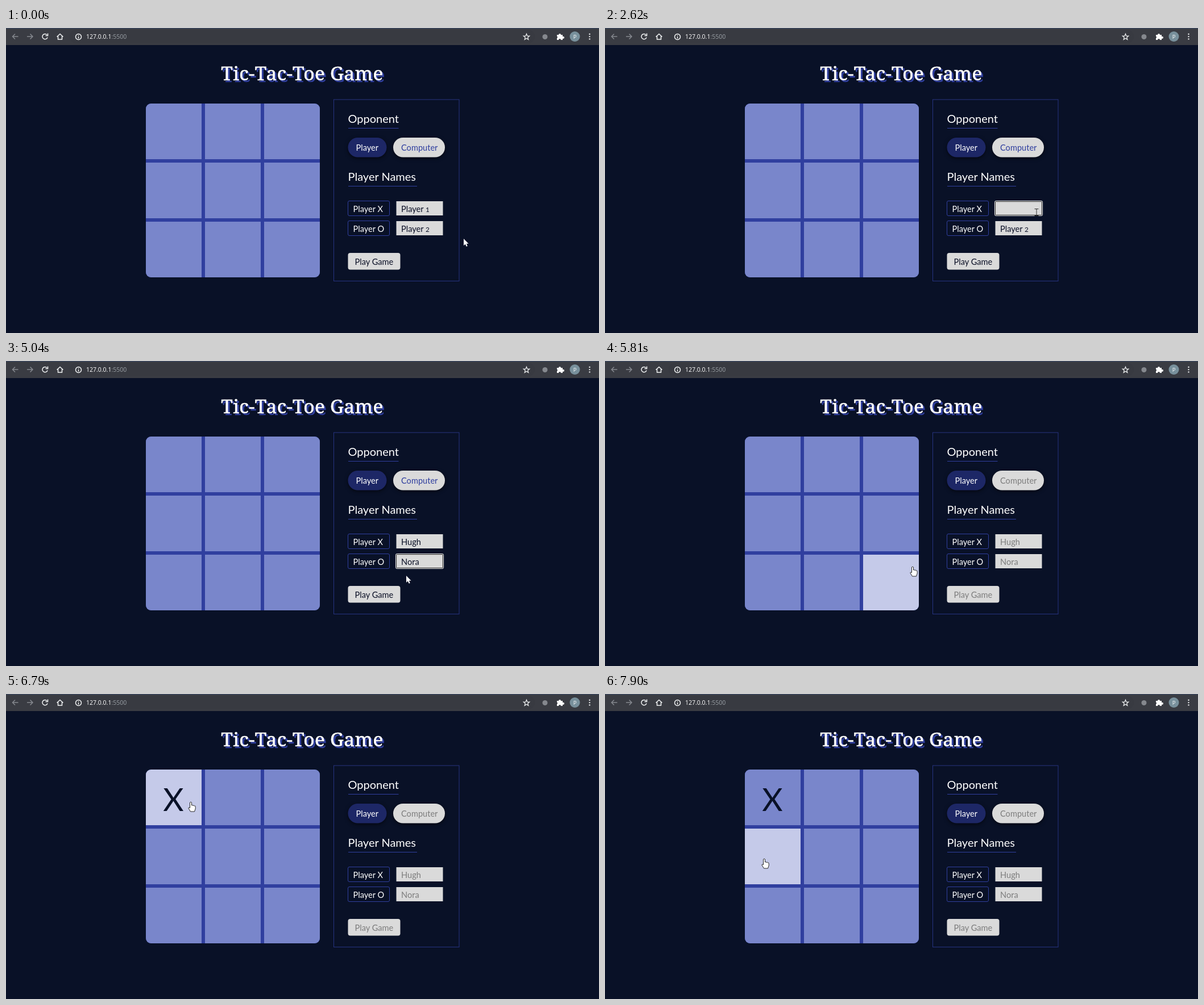
Write an HTML page that moves like this. It is 1043 px wide and 537 px high and loops after 8 s.

```html
<!DOCTYPE html>
<html lang="en">
<head>
<meta charset="utf-8">
<title>Tic-Tac-Toe Game</title>
<style>
  html, body { margin: 0; width: 100%; height: 100%; overflow: hidden; background: #091127; }
  svg { display: block; width: 100vw; height: 100vh; }
  text { font: 14.6px Lato, sans-serif; fill: #fff; white-space: pre; }
  .title { font: 33.5px "Noto Serif", serif; letter-spacing: .3px; text-anchor: middle;
    stroke: #fff; stroke-width: .6; filter: drop-shadow(3px 3px 0 #303f9f); }
  .heading { font-size: 20px; }
  .url, #popup text { font: 10.5px "Open Sans", sans-serif; }
  .dim { fill: #9aa0a6; }
  .digit { font-size: 11.8px; }
  .mark { font-size: 56px; fill: #091127; text-anchor: middle; }
  .pill { filter: drop-shadow(0 2px 3px #0009); }
  .light { fill: #dadada; }
  .dark { fill: #0b1026; }
  .outline { fill: none; stroke: #303f9f; }
  .icon { fill: none; stroke: #f1f3f4; stroke-width: 1.5; }
  .off { stroke: #85888e; }
  .playing .control { fill: #7d7d7d; }
</style>
</head>
<body>
<svg id="stage" viewBox="0 0 1043 537" preserveAspectRatio="none">
  <defs><clipPath id="round"><rect x="246" y="133" width="306" height="306" rx="9"/></clipPath></defs>

  <!-- browser bar -->
  <rect width="1043" height="30" fill="#3a3c43"/>
  <rect x="112" y="3" width="818" height="24" rx="12" fill="#383a41"/>
  <rect width="1043" height="1" fill="#34435f"/>
  <path class="icon off" d="M21.500 15H11.500M16 10.500L11.500 15L16 19.500"/>
  <path class="icon off" d="M37 15H47M42.500 10.500L47 15L42.500 19.500"/>
  <path class="icon" d="M72 12A4.600 4.600 0 1 0 73 16.500M73.500 9.500V13.500H69.500"/>
  <path class="icon" d="M89.500 15.500L95 10.500L100.500 15.500M91.500 14.500V20H98.500V14.500"/>
  <circle class="icon" cx="127.500" cy="15.500" r="5" stroke-width="1.200"/>
  <path class="icon" d="M127.500 12.500V13.800M127.500 15V18.500"/>
  <text class="url" x="141" y="19.300">127.0.0.1<tspan class="dim">:5500</tspan></text>
  <path id="star" class="icon" style="stroke-width:1.200"/>
  <circle cx="948" cy="15.500" r="4.500" fill="#85888e"/>
  <path fill="#fff" d="M969 12H972A2 2 0 1 1 976 12H979V15A2 2 0 1 1 979 18.500V21H976A2 2 0 0 0 972 21H969V18A2 2 0 0 0 969 14.500Z"/>
  <circle cx="1000.500" cy="15" r="9" fill="#78909c"/>
  <text class="url" x="1000.500" y="18.500" text-anchor="middle" style="font-size:9.500px">P</text>
  <path d="M1026.500 10.800V20" stroke="#f1f3f4" stroke-width="2.400" stroke-linecap="round" stroke-dasharray="0 4.300"/>

  <text class="title" x="521" y="91.500">Tic-Tac-Toe Game</text>

  <g clip-path="url(#round)">
    <rect x="246" y="133" width="306" height="306" fill="#303f9f"/>
    <g id="cells"></g>
  </g>
  <text id="mark" class="mark" x="294.500" y="206">X</text>

  <!-- settings panel -->
  <rect class="outline" x="576.500" y="126" width="220.500" height="319.500" stroke-opacity=".75"/>
  <text class="heading" x="601.500" y="166.500">Opponent</text>
  <text class="heading" x="601.500" y="269">Player Names</text>
  <path class="outline" d="M602 176.500H690.500M602 278.500H723" stroke-width="1.200"/>
  <rect class="pill" x="601.500" y="193" width="68" height="34.500" rx="17.200" fill="#1d2766"/>
  <rect class="pill light" x="681" y="193" width="91" height="34.500" rx="17.200"/>
  <text x="615.500" y="216">Player</text>
  <text class="control" x="695" y="216" fill="#303f9f" id="computer">Computer</text>
  <rect class="outline" x="601.500" y="304.500" width="73" height="26" rx="2.500"/>
  <rect class="outline" x="601.500" y="339.500" width="73" height="26" rx="2.500"/>
  <text x="610.500" y="323.500">Player X</text>
  <text x="610.500" y="358.500">Player O</text>
  <rect class="light" x="686.500" y="305" width="82" height="25"/>
  <rect class="light" x="686.500" y="340" width="82" height="25"/>
  <g id="ring" fill="none">
    <rect x="685.500" y="304.500" width="84" height="26" rx="2" stroke="#fff"/>
    <rect x="686.500" y="305.500" width="82" height="24" rx="1" stroke="#101010"/>
  </g>
  <rect id="selection" y="344" height="18" fill="#3390ff"/>
  <text id="nameX" class="control dark" x="695" y="323.500"></text>
  <text id="nameO" class="control dark" x="695" y="358.500"></text>
  <path id="caret" d="M743.500 310V326" stroke="#222"/>
  <rect class="light" x="601.500" y="396" width="92" height="29.500" rx="4"/>
  <text class="control dark" x="613.500" y="417">Play Game</text>

  <g id="popup">
    <rect x="687" width="156" rx="2" fill="#292a2d" style="filter:drop-shadow(0 1px 1px #0008)"/>
    <text x="695"></text><text x="695"></text>
  </g>

  <g id="pointer">
    <path id="arrow" fill="#fff" d="M0 0V12L2.800 9.500L4.700 13.800L6.700 12.900L4.900 8.700H8.600Z"/>
    <path id="beam" fill="none" stroke="#333" d="M-3.500 -5.500H3.500M0 -5.500V6.500M-3.500 6.500H3.500"/>
    <path id="hand" fill="#fff" stroke="#111" stroke-width=".9" stroke-linejoin="round"
      d="M-1.500 1Q0 -1 1.500 1V6Q3 5 4 6.500Q5.500 5.500 6.300 7Q8 6.300 8.200 8.500V12L6.500 17H-.5L-4.200 11Q-4 9 -1.500 10.500Z"/>
  </g>
</svg>

<script>
const LOOP = 8000, STEP = 110;
const GAME_START = 5590, MARK_TIME = 6790;
const $ = id => document.getElementById(id);
const show = (node, on) => node.style.display = on ? '' : 'none';

// [time, x, y]
const track = [
  [0, 805, 371], [100, 799, 362], [330, 799, 362], [860, 759, 324],
  [3940, 759, 324], [4160, 752, 352], [4500, 699, 354], [4930, 699, 354],
  [5040, 704, 378], [5480, 668, 408], [5590, 660, 402], [5810, 541, 362],
  [6360, 372, 216], [6690, 325, 190], [6910, 325, 190], [7240, 362, 222],
  [7780, 283, 293], [7900, 280, 290]
];
const typedX = [
  [0, 'Player 1'], [1530, 'Player '], [1670, 'Player'], [1850, 'Playe'], [1970, 'Play'],
  [2080, 'Pla'], [2200, 'Pl'], [2420, 'P'], [2520, ''],
  [2970, 'H'], [3070, 'Hu'], [3290, 'Hug'], [3500, 'Hugh']
];
const typedO = [[0, 'Player 2'], [4720, 'N'], [4800, 'No'], [4870, 'Nor'], [4940, 'Nora']];
const suggestions = [
  [0, []], [1530, ['Player 1']], [2420, ['Player 1', 'Player 2']], [2620, []],
  [2970, ['Hugh']], [3500, []], [4720, ['Nora']], [4940, []]
];
const latest = (list, t) => list.findLast(entry => entry[0] <= t);

function pointerAt(t) {
  const i = track.findLastIndex(p => p[0] <= t);
  const [t0, x0, y0] = track[i], [t1, x1, y1] = track[i + 1] || [LOOP, x0, y0];
  const k = Math.floor((t - t0) / STEP) * STEP / (t1 - t0);
  return [x0 + (x1 - x0) * k, y0 + (y1 - y0) * k];
}

const inside = (x, y, left, top, w, h) => x >= left && x < left + w && y >= top && y < top + h;

function pointerKind(x, y, playing) {
  if (inside(x, y, 686, 305, 83, 25) || inside(x, y, 686, 340, 83, 25)) return 'beam';
  if (inside(x, y, 246, 133, 306, 306)) return 'hand';
  return !playing && inside(x, y, 601, 396, 92, 30) ? 'hand' : 'arrow';
}

const cells = Array.from({ length: 9 }, (_, i) => {
  const node = document.createElementNS('http://www.w3.org/2000/svg', 'rect');
  const x = 246 + i % 3 * 104, y = 133 + Math.floor(i / 3) * 104;
  for (const [key, value] of Object.entries({ x, y, width: 98, height: 98 })) node.setAttribute(key, value);
  $('cells').append(node);
  return { node, x, y };
});

$('star').setAttribute('d', 'M' + Array.from({ length: 10 }, (_, i) => {
  const r = i % 2 ? 2.4 : 5.6, a = (i / 5 - .5) * Math.PI;
  return `${915.5 + r * Math.cos(a)} ${15.8 + r * Math.sin(a)}`;
}).join('L') + 'Z');
$('computer').style.fill = '';

// Digits are set at lowercase height.
function setName(node, name) {
  if (node.dataset.name === name) return;
  node.dataset.name = name;
  node.innerHTML = name.replace(/\d/, '<tspan class="digit">$&</tspan>');
}

function drawPopup(rows, top) {
  const [box, ...labels] = $('popup').children;
  show($('popup'), rows.length);
  box.setAttribute('y', top);
  box.setAttribute('height', 12 + rows.length * 30);
  labels.forEach((label, i) => {
    label.textContent = rows[i] || '';
    label.setAttribute('y', top + 25 + i * 30);
  });
}

function draw(t) {
  const playing = t >= GAME_START;
  const [x, y] = pointerAt(t), kind = pointerKind(x, y, playing);
  $('stage').classList.toggle('playing', playing);
  $('computer').style.fill = playing ? '' : '#303f9f';

  setName($('nameX'), latest(typedX, t)[1]);
  setName($('nameO'), latest(typedO, t)[1]);
  const second = t >= 4160;
  show($('ring'), t >= 1120 && !playing);
  $('ring').setAttribute('transform', `translate(0 ${second ? 35 : 0})`);
  show($('caret'), t >= 1120 && t < 1530);
  drawPopup(latest(suggestions, t)[1], second ? 367 : 332);

  const selecting = t >= 4270 && t < 4720, left = Math.max(695, x);
  show($('selection'), selecting);
  $('selection').setAttribute('x', left);
  $('selection').setAttribute('width', Math.max(0, 744 - left));

  for (const cell of cells) {
    const hover = playing && inside(x, y, cell.x, cell.y, 98, 98);
    cell.node.setAttribute('fill', hover ? '#c5cae9' : '#7986cb');
  }
  show($('mark'), t >= MARK_TIME);

  for (const id of ['arrow', 'beam', 'hand']) show($(id), id === kind);
  $('pointer').setAttribute('transform', `translate(${x} ${y})`);
}

const start = performance.now();
function tick() {
  draw((performance.now() - start) % LOOP);
  requestAnimationFrame(tick);
}
tick();
</script>
</body>
</html>
```
